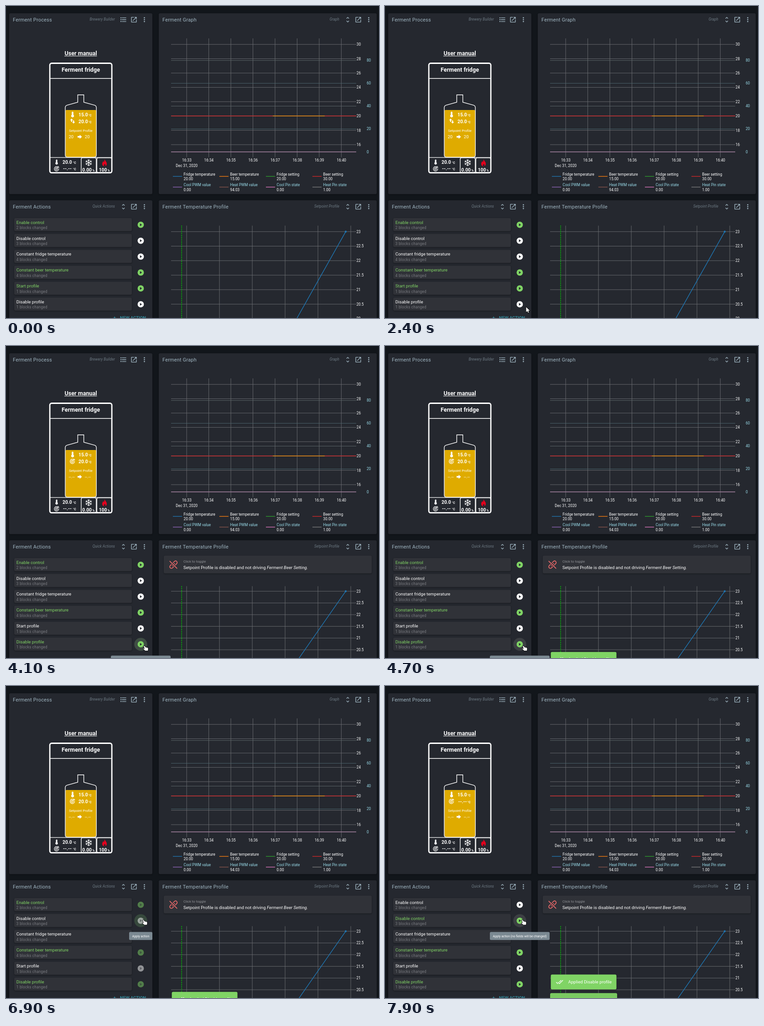
Write an HTML page with a canvas that moves like this. It is 818x684 px and loops after 8000 ms.

```html
<!DOCTYPE html>
<html lang="en">
<head>
<meta charset="utf-8">
<title>Ferment dashboard</title>
<style>
html, body { margin: 0; width: 100%; height: 100%; overflow: hidden; background: #12161b; }
canvas { display: block; }
</style>
</head>
<body>
<canvas id="stage" width="818" height="684"></canvas>
<script>
const ctx = document.getElementById('stage').getContext('2d');
const LOOP = 8000;
const FONT = 'Roboto, "Open Sans", sans-serif';
const C = {
  bg: '#12161b', panel: '#25282f', row: '#303238', title: '#a1b7c3', kind: '#6d7a83',
  green: '#80d465', grid: '#6d6f73', blue: '#9adcea', beer: '#dfab00', white: '#fff'
};

// Times at which the state changes
const T = {
  click1: 3500, set1: 3600, done1: 3800, resize: 4100, leave: 5500,
  click2: 6900, set2: 7000, done2: 7200, applied2: 7300
};

// Pointer waypoints: time, x, y
const PATH = [
  [800, 20, 1], [1200, 185, 155], [1600, 318.5, 370], [1800, 430, 465], [2000, 503.5, 560],
  [2200, 395, 642], [2300, 335, 657], [2400, 309.5, 660], [2700, 309.5, 660], [3000, 304, 657],
  [5400, 304, 657], [5500, 312, 648], [5800, 317, 600], [6100, 313.5, 533.5], [6300, 304, 516],
  [6500, 302, 512.5]
];

const ICON = {
  open: new Path2D('M19 19H5V5h7V3H5a2 2 0 0 0-2 2v14a2 2 0 0 0 2 2h14a2 2 0 0 0 2-2v-7h-2zM14 3v2h3.6l-9.8 9.8 1.4 1.4L19 6.4V10h2V3z'),
  unfold: new Path2D('M12 5.8L15.2 9l1.4-1.4L12 3 7.4 7.6 8.8 9zM12 18.2L8.8 15l-1.4 1.4L12 21l4.6-4.6-1.4-1.4z'),
  more: new Path2D('M10 6a2 2 0 1 0 4 0a2 2 0 1 0-4 0M10 12a2 2 0 1 0 4 0a2 2 0 1 0-4 0M10 18a2 2 0 1 0 4 0a2 2 0 1 0-4 0'),
  list: new Path2D('M7 5h14v2H7zM7 11h14v2H7zM7 17h14v2H7zM2.5 4.5h3v3h-3zM2.5 10.5h3v3h-3zM2.5 16.5h3v3h-3z'),
  done: new Path2D('M18 7l-1.4-1.4-6.3 6.3 1.4 1.4zM22.2 5.6L11.7 16.2 7.5 12l-1.4 1.4 5.6 5.6 12-12zM.4 13.4L6 19l1.4-1.4L1.8 12z'),
  play: new Path2D('M9.8 7.5v9l6.4-4.5z'),
  arrow: new Path2D('M4 9h8V4l9 8-9 8v-5H4z'),
  swap: new Path2D('M8 2l6 6.5h-4V15H6V8.5H2zM16 22l6-6.5h-4V9h-4v6.5h-4z'),
  heat: new Path2D('M11 2a2.8 2.8 0 0 1 4 2.5v9a5 5 0 1 1-6 0v-9a2.8 2.8 0 0 1 2-2.5z'),
  fire: new Path2D('M12 1C13 6 19 9 19 15.5C19 20 16 23 12 23C8 23 5 20 5 15.8C5 12 7 10 8 7C9 8 9.5 9 9.5 10.5C11.5 8 12.3 5 12 1z'),
  pointer: new Path2D('M0 0V11.2L2.6 8.8L4.4 12.6L6.2 11.8L4.5 8.1H8z'),
  hand: new Path2D('M-2 1.2Q-1.2-.2 0 1L2.5 3.8L6 4.2Q7.8 4.6 7.6 6.5L7.2 11H1.2L-2.6 7.3Q-2.8 5.8-1 6.2L.3 6.9z')
};

function text(str, x, y, size, color, opt = {}) {
  ctx.font = `${opt.style || ''} ${opt.weight || 400} ${size}px ${FONT}`;
  ctx.letterSpacing = (opt.gap || 0) + 'px';
  ctx.textAlign = opt.align || 'left';
  ctx.textBaseline = 'alphabetic';
  ctx.fillStyle = color;
  ctx.fillText(str, x, y);
  return ctx.measureText(str).width;
}

function line(x1, y1, x2, y2, color, width = .9) {
  ctx.strokeStyle = color;
  ctx.lineWidth = width;
  ctx.beginPath();
  ctx.moveTo(x1, y1);
  ctx.lineTo(x2, y2);
  ctx.stroke();
}

function box(x, y, w, h, r, color, shadow) {
  ctx.save();
  if (shadow) {
    ctx.shadowColor = 'rgba(0,0,0,.4)';
    ctx.shadowBlur = 3;
    ctx.shadowOffsetY = 1;
  }
  ctx.fillStyle = color;
  ctx.beginPath();
  ctx.roundRect(x, y, w, h, r);
  ctx.fill();
  ctx.restore();
}

function outline(x, y, w, h, r, width) {
  ctx.strokeStyle = C.white;
  ctx.lineWidth = width;
  ctx.beginPath();
  ctx.roundRect(x, y, w, h, r);
  ctx.stroke();
}

function disc(x, y, r, color) {
  ctx.fillStyle = color;
  ctx.beginPath();
  ctx.arc(x, y, r, 0, Math.PI * 2);
  ctx.fill();
}

function icon(name, x, y, color, scale = .68) {
  ctx.save();
  ctx.translate(x, y);
  ctx.scale(scale, scale);
  ctx.translate(-12, -12);
  ctx.fillStyle = color;
  ctx.fill(ICON[name]);
  ctx.restore();
}

const clamp = v => Math.max(0, Math.min(1, v));
const ramp = (t, start, length) => clamp((t - start) / length);

// The CSS "ease" curve
function ease(x) {
  let lo = 0, hi = 1, s = .5;
  for (let i = 0; i < 18; i++) {
    s = (lo + hi) / 2;
    const bx = .75 * s * (1 - s) ** 2 + .75 * s * s * (1 - s) + s ** 3;
    if (bx < x) lo = s; else hi = s;
  }
  return .3 * s * (1 - s) ** 2 + 3 * s * s * (1 - s) + s ** 3;
}

function panel(x, y, w, h, name, kind, first) {
  box(x, y, w, h, 3, C.panel, true);
  text(name, x + 8, y + 17.6, 10.9, C.title, { gap: .23 });
  const right = x + w, cy = y + 14;
  text(kind, right - 82, y + 16.3, 8.1, C.kind, { style: 'italic', align: 'right', gap: .08 });
  icon(first, right - 63.5, cy, C.title);
  icon('open', right - 40.5, cy, C.title);
  icon('more', right - 17.5, cy, C.title);
}

function target(x, y) {
  ctx.strokeStyle = C.white;
  ctx.lineWidth = 1.2;
  for (const r of [4.9, 2.4]) {
    ctx.beginPath();
    ctx.arc(x, y, r, -.2, Math.PI * 1.65);
    ctx.stroke();
  }
  line(x, y, x + 4, y - 4, C.white, 1.3);
  line(x + 3.2, y - 3.2, x + 6, y - 3.6, C.white, 1.4);
  line(x + 3.2, y - 3.2, x + 3.6, y - 6, C.white, 1.4);
}

function snowflake(x, y) {
  ctx.save();
  ctx.translate(x, y);
  for (let i = 0; i < 6; i++) {
    ctx.rotate(Math.PI / 3);
    line(0, 0, 0, -7.6, C.white, 1.2);
    line(0, -4, -2.3, -6.3, C.white, 1.1);
    line(0, -4, 2.3, -6.3, C.white, 1.1);
  }
  ctx.restore();
}

function reading(value, unit, x, y, unitX) {
  text(value, x, y, 10.3, C.white, { weight: 700 });
  text(unit, unitX, y, 6.8, C.white, { weight: 700 });
}

function fridge(t) {
  const bold = { weight: 700, align: 'center' };
  text('User manual', 164, 108.3, 12.6, C.white, bold);
  line(128, 109.8, 199.5, 109.8, C.white, 1.1);
  outline(96.1, 125.5, 136, 240.1, 4, 2.77);
  text('Ferment fridge', 164, 143.6, 12.6, C.white, bold);
  line(96, 158.8, 232, 158.8, C.white, 1.4);

  box(130.4, 228, 67.4, 103.3, [2, 2, 5, 5], C.beer);
  ctx.strokeStyle = C.white;
  ctx.lineWidth = 1.4;
  ctx.stroke(new Path2D('M157.4 194.7H170.6V211L194 217.3Q198.2 218.6 198.2 223V326.5Q198.2 331.4 193 331.4H135Q129.9 331.4 129.9 326.5V223Q129.9 218.6 134.2 217.3L157.4 211z'));

  icon('heat', 146, 237.8, C.white, .6);
  reading('15.0', '°C', 159, 241.5, 180.5);
  if (t < T.set1) icon('swap', 146, 252.3, C.white, .55);
  else target(145.5, 253);
  const off = t >= T.set2 + 50;
  reading(off ? '--.--' : '20.0', '°C', off ? 160.5 : 159, 256.5, 180.5);
  text('Setpoint Profile', 164, 276, 7.6, C.white, { align: 'center' });
  const step = t < T.set1 ? '20' : '--.--';
  text(step, 137.5, 290, 9.5, C.white);
  icon('arrow', 161.5, 286.8, C.white, .56);
  text(step, 172.8, 290, 9.5, C.white);

  line(96, 332.1, 232, 332.1, C.white, 1.4);
  outline(164.9, 332.9, 32.9, 32.4, 3, 1.4);
  outline(199.3, 332.9, 32.6, 32.4, 3, 1.4);
  icon('heat', 111, 342, C.white, .53);
  reading('20.0', '°C', 124, 346, 146.5);
  target(110.8, 357);
  reading('--.--', '°C', 125, 360, 146.5);
  snowflake(181.3, 343.5);
  icon('fire', 216, 343.5, '#e5001d', .72);
  icon('fire', 216.5, 348.3, C.panel, .26);
  reading('0.00', '%', 167.3, 363, 189.3);
  reading('100', '%', 203.7, 363, 222.6);
}

function graph() {
  for (let i = 0; i < 8; i++) {
    const x = 396.2 + i * 48.45;
    line(x, 71, x, 331.5, C.grid);
    text('16:' + (33 + i), x + .3, 341.4, 8.3, C.white, { align: 'center' });
    const y = 84.2 + i * 31.4;
    line(362, y, 768, y, C.grid);
    text(30 - 2 * i, 768.8, y + 2.9, 8.2, C.white);
  }
  for (let i = 0; i < 5; i++) {
    const y = 119.4 + i * 50.05;
    line(362, y, 768, y, i % 2 ? '#4d6870' : '#60696d');
    text(80 - 20 * i, 791, y + 2.9, 8.2, C.blue);
  }
  text('Dec 31, 2020', 396.3, 352.6, 8.3, C.white, { align: 'center' });
  line(362, 241, 585, 241, '#c62b2d', 1.4);
  line(585, 241, 699, 241, '#e8860f', 1.4);
  line(699, 241, 768, 241, '#c62b2d', 1.4);
  line(362, 319.7, 768, 319.7, '#a4809f', 1.6);

  const series = [
    ['Fridge temperature', '20.00', '#1f77b4'], ['Beer temperature', '15.00', '#ff7f0e'],
    ['Fridge setting', '20.00', '#2ca02c'], ['Beer setting', '30.00', '#d62728'],
    ['Cool PWM value', '0.00', '#9467bd'], ['Heat PWM value', '94.03', '#8c564b'],
    ['Cool Pin state', '0.00', '#e377c2'], ['Heat Pin state', '1.00', '#7f7f7f']
  ];
  series.forEach(([name, value, color], i) => {
    const x = 366 + (i % 4) * 102, y = i < 4 ? 373.5 : 397;
    line(x, y, x + 20, y, color, 1.3);
    text(name, x + 23.6, y - 2, 8.2, i < 4 ? C.white : C.blue);
    text(value, x + 23.6, y + 8.8, 8.2, C.white);
  });
}

function linkOff(x, y) {
  ctx.save();
  ctx.translate(x, y);
  ctx.rotate(-Math.PI / 4);
  ctx.lineCap = 'round';
  ctx.strokeStyle = '#ec6a6a';
  ctx.lineWidth = 1.7;
  ctx.stroke(new Path2D('M-2-3.5H-6.5A3.5 3.5 0 0 0-6.5 3.5H-1.5M2 3.5H6.5A3.5 3.5 0 0 0 6.5-3.5H1.5M-3.5 0H-1M1.5 0H3.5'));
  ctx.restore();
  line(x - 8.5, y - 8, x + 8, y + 8.5, C.row, 4);
  line(x - 8.5, y - 8, x + 8, y + 8.5, '#ec6a6a', 1.7);
}

function profile(t) {
  const open = t >= T.set1, small = t >= T.resize;
  if (open) {
    box(346, 459.5, 456, 39, 3, C.row, true);
    linkOff(367.3, 479.3);
    text('Click to toggle', 389, 475, 7.8, '#8f9195');
    const w = text('Setpoint Profile is disabled and not driving ', 389, 489.4, 9.68, C.white);
    text('Ferment Beer Setting.', 389 + w, 489.4, 9.68, C.white, { style: 'italic' });
  }
  const head = open ? 526.5 : 481.5;
  const top = small ? 537.7 : open ? 539.7 : 494.7;
  const step = small ? 25.65 : 31.8;
  for (let i = 0; i < 6; i++) {
    const x = 396.1 + i * 72;
    line(x, head, x, 684, C.grid);
  }
  for (let i = 0; i < 7; i++) {
    const y = top + i * step;
    line(362, y, 768, y, C.grid);
    text(23 - i / 2, 768.5, y + 2.9, 8.2, C.white);
  }
  ctx.setLineDash([2.04, 2.04]);
  line(385.2, head, 385.2, 684, '#00c800', 1.7);
  ctx.setLineDash([]);
  line(745, top, 637.5, top + 6 * step, '#1f77b4', 1.4);
  disc(745, top, 2.1, '#1f77b4');
}

const buttonY = i => 479.7 + i * 34.85;

function actions(t, hover) {
  const rows = [
    ['Enable control', 2, t < T.set2 + 50], ['Disable control', 3, t >= T.applied2],
    ['Constant fridge temperature', 4, false], ['Constant beer temperature', 4, true],
    ['Start profile', 1, t < T.set1], ['Disable profile', 1, t >= T.set1]
  ];
  const fade = length => t >= T.click2 ? 1 - ramp(t, T.done2, length)
    : t >= T.click1 ? 1 - ramp(t, T.done1, length) : 0;
  rows.forEach(([name, count, on], i) => {
    const y = buttonY(i), color = on ? C.green : C.white;
    box(18, y - 14.7, 258, 28.6, 3, C.row, true);
    text(name, 22.8, y - 2, 9.6, color);
    text(`${count} blocks changed`, 22.8, y + 9.4, 8.16, '#797b80', { gap: .27 });
    ctx.globalAlpha = 1 - .5 * fade(230);
    if (hover === i) {
      disc(295.5, y, 14.2, '#3c3f43');
      disc(295.5, y, 14.2, `rgba(90,180,80,${.3 * fade(500)})`);
    }
    disc(295.5, y, 6.9, color);
    icon('play', 295.3, y, C.panel);
    ctx.globalAlpha = 1;
  });
  line(235, 684.2, 241.5, 684.2, '#3397ab', 1.4);
  line(238.2, 681, 238.2, 684, '#3397ab', 1.4);
  text('NEW ACTION', 250, 687.4, 9.52, '#3397ab', { weight: 500 });
}

function tooltip(row, applied, alpha) {
  if (alpha <= 0) return;
  const label = applied ? 'Apply action (no fields will be changed)' : 'Apply action';
  const w = applied ? 131 : 51, y = buttonY(row) + 24.8;
  ctx.globalAlpha = alpha;
  box(295.5 - w / 2, y, w, 17.3, 2.5, '#7b8992');
  text(label, 295.5, y + 11.2, 6.8, C.white, { align: 'center' });
  ctx.globalAlpha = 1;
}

function tooltips(t) {
  if (t < 6200) tooltip(5, t >= T.set1, ramp(t, 2950, 200) * (1 - ramp(t, T.leave - 50, 200)));
  else tooltip(1, t >= T.applied2, ramp(t, 6300, 200));
}

function toast(label, w, y, alpha) {
  const left = 435.6 - w / 2;
  ctx.globalAlpha = alpha;
  box(left, y, w, 32.6, 3, C.green, true);
  icon('done', left + 19.2, y + 16.2, C.white);
  text(label, left + 38.1, y + 19.7, 9.6, C.white);
  ctx.globalAlpha = 1;
}

function toasts(t) {
  const a = ease(ramp(t, T.done1, 1000)), b = ease(ramp(t, T.done2 - 10, 1000));
  if (t > T.done1) toast('Applied Disable profile', 144, 670.4 + 50 * (1 - a) - 40 * b, a);
  if (t > T.done2) toast('Applied Disable control', 147, 670.4 + 50 * (1 - b), b);
}

function pointerAt(t) {
  if (t < PATH[0][0]) return null;
  const i = PATH.findIndex(p => p[0] > t);
  if (i < 0) return PATH[PATH.length - 1].slice(1);
  const [t0, x0, y0] = PATH[i - 1], [t1, x1, y1] = PATH[i];
  const k = (t - t0) / (t1 - t0);
  return [x0 + (x1 - x0) * k, y0 + (y1 - y0) * k];
}

function hoverRow(pos) {
  if (!pos) return -1;
  const near = i => Math.hypot(pos[0] - 295.5, pos[1] - buttonY(i)) < 13.5;
  return [0, 1, 2, 3, 4, 5].findIndex(near);
}

function pointer(pos, hand) {
  if (!pos) return;
  const shape = hand ? ICON.hand : ICON.pointer;
  ctx.save();
  ctx.translate(pos[0], pos[1]);
  ctx.lineJoin = 'round';
  ctx.lineWidth = 1.6;
  ctx.strokeStyle = '#000';
  ctx.stroke(shape);
  ctx.fillStyle = C.white;
  ctx.fill(shape);
  ctx.restore();
}

function draw(t) {
  ctx.fillStyle = C.bg;
  ctx.fillRect(0, 0, 818, 684);
  ctx.fillStyle = '#0b0e12';
  ctx.fillRect(0, 0, 818, 1);
  panel(7, 16, 314, 396.5, 'Ferment Process', 'Brewery Builder', 'list');
  panel(335, 16, 478, 396.5, 'Ferment Graph', 'Graph', 'unfold');
  panel(7, 426, 314, 280, 'Ferment Actions', 'Quick Actions', 'unfold');
  panel(335, 426, 478, 280, 'Ferment Temperature Profile', 'Setpoint Profile', 'unfold');
  const pos = pointerAt(t), hover = hoverRow(pos);
  fridge(t);
  graph();
  actions(t, hover);
  profile(t);
  tooltips(t);
  toasts(t);
  pointer(pos, hover >= 0);
}

// The picture advances ten times a second
const start = performance.now();
function tick() {
  const t = (performance.now() - start) % LOOP;
  draw(Math.floor(t / 100) * 100);
  requestAnimationFrame(tick);
}
tick();
</script>
</body>
</html>
```
